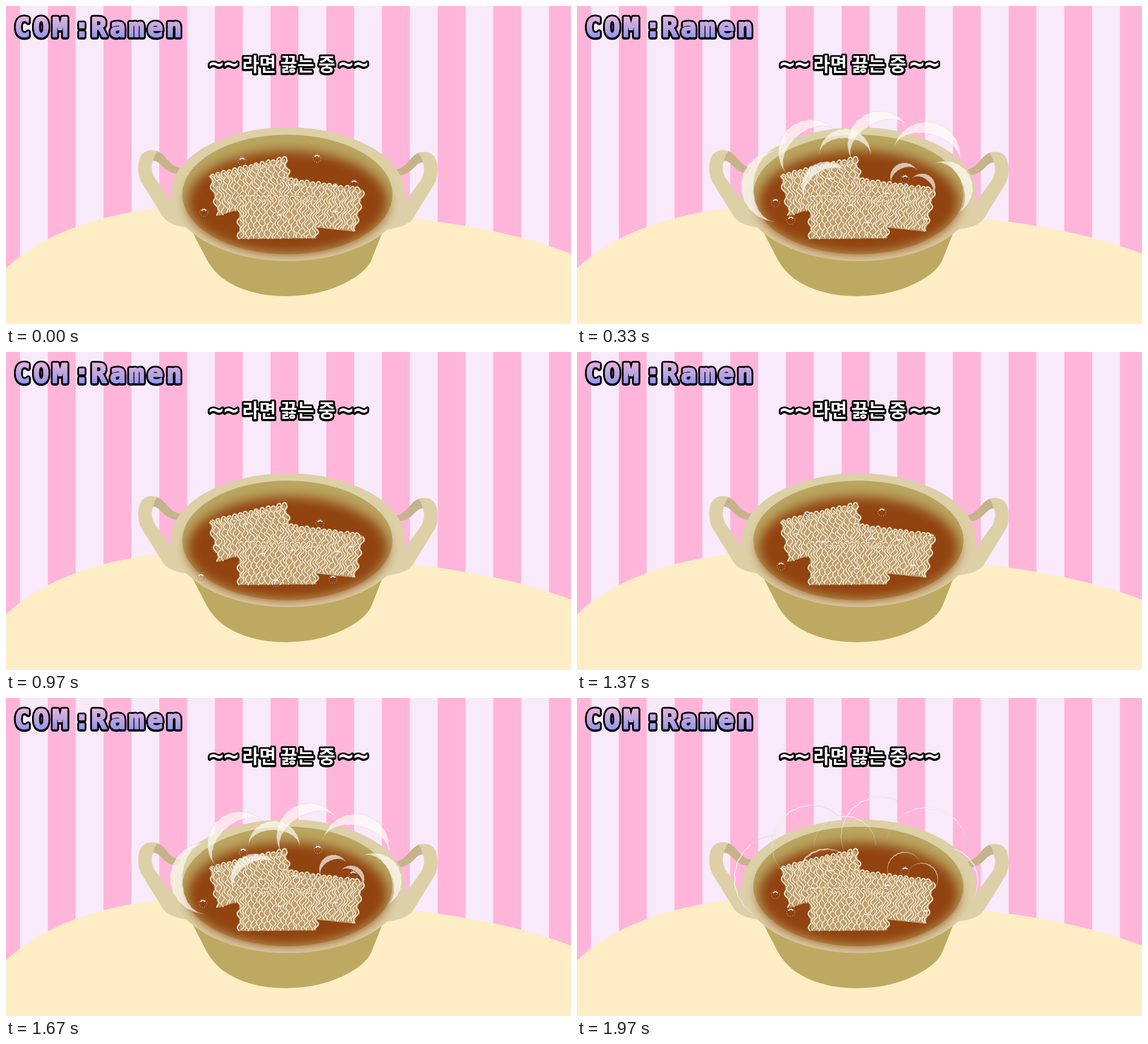
An HTML page with a canvas for the animation above (2.01 s loop, 997 by 561 pixels).

```html
<!DOCTYPE html>
<html lang="ko">
<head>
<meta charset="utf-8">
<title>Ramen</title>
<style>
html, body { margin: 0; width: 100%; height: 100%; overflow: hidden; }
canvas { display: block; }
</style>
</head>
<body>
<canvas id="stage" width="997" height="561"></canvas>
<script>
const W = 997, H = 561, LOOP = 2010, STEP = 33.4, TAU = Math.PI * 2;
const ctx = document.getElementById('stage').getContext('2d');
const scene = document.createElement('canvas');
scene.width = W;
scene.height = H;
const bg = scene.getContext('2d');

let seed = 7;
const rand = () => (seed = seed * 16807 % 2147483647) / 2147483647;

function shape(color, d) {
  bg.fillStyle = color;
  bg.fill(new Path2D(d));
}

function ellipse(color, x, y, rx, ry) {
  bg.beginPath();
  bg.ellipse(x, y, rx, ry, 0, 0, TAU);
  bg.fillStyle = color;
  bg.fill();
}

function gradient(y0, y1, from, to) {
  const g = bg.createLinearGradient(0, y0, 0, y1);
  g.addColorStop(0, from);
  g.addColorStop(1, to);
  return g;
}

function backdrop() {
  bg.fillStyle = '#f8eafa';
  bg.fillRect(0, 0, W, H);
  bg.fillStyle = '#ffb5da';
  for (let x = -24.4; x < W; x += 98.25) bg.fillRect(x, 0, 49.2, H);
  shape('#feedc5', 'M0 463C60 405 160 368 275 356L300 354L700 373C800 383 910 403 997 437V561H0Z');
}

function handle() {
  shape('#c5b38a', 'M256 256Q270 252 282 268Q294 284 309 286L303 296Q286 295 274 281Q264 270 256 274Z');
  shape('#ddd0a7', 'M268 256Q246 250 237 266Q229 288 238 309L277 372Q288 388 328 392L312 350L292 344' +
    'L262 303Q253 286 261 268Q263 260 268 256Z');
}

function pot() {
  shape('#bea963', 'M326 393L354 447Q364 466 383 481Q427 512 495 512Q560 511 607 484Q634 469 644 450L664 400Z');
  handle();
  bg.save();
  bg.translate(995, 3);
  bg.scale(-1, 1);
  handle();
  bg.restore();
  ellipse('#baa660', 496.5, 332.5, 185.5, 105.5);
  ellipse('#ddd0a7', 497.5, 332, 206.5, 118);
  bg.save();
  bg.clip();
  ellipse('#baa660', 496.5, 332.5, 185.5, 105.5);
  bg.filter = 'blur(10px)';
  ellipse('#914310', 497, 346, 177, 91);
  bg.restore();
}

// Curly strands woven between the corners a, b, c, d (clockwise from top left).
function noodles(a, b, c, d) {
  const mix = (p, q, k) => p + (q - p) * k;
  const at = (u, v) => [0, 1].map(i => mix(mix(a[i], b[i], u), mix(d[i], c[i], u), v));
  const width = Math.hypot(b[0] - a[0], b[1] - a[1]);
  const height = Math.hypot(d[0] - a[0], d[1] - a[1]);
  const draw = path => {
    bg.strokeStyle = 'rgba(140,95,50,.6)';
    bg.lineWidth = 4;
    bg.stroke(path);
    bg.strokeStyle = '#f0e1c1';
    bg.lineWidth = 2.6;
    bg.stroke(path);
  };
  bg.lineCap = bg.lineJoin = 'round';
  shape('#c3a475', 'M' + [a, b, c, d].join('L') + 'Z');

  for (let u = .03; u < 1; u += 10 / width) {
    const [x, y] = at(u, .04), loop = new Path2D();
    loop.ellipse(x, y, 4, 4 + rand() * 3, rand() - .5, 0, TAU);
    draw(loop);
  }
  const count = Math.round(width / 4.8);
  for (let j = 0; j <= count; j++) {
    const path = new Path2D(), phase = rand() * TAU, wave = 18 + rand() * 9;
    const start = rand() * .06, end = 1 - rand() * .03;
    for (let v = start; v <= end; v += .02) {
      const [x, y] = at(j / count, v);
      path.lineTo(x + 3.4 * Math.sin(v * height / wave * TAU + phase), y);
    }
    draw(path);
  }
}

function outlined(text, x, y, font, fill, spacing = 0, bold = 0) {
  bg.font = font;
  bg.letterSpacing = spacing + 'px';
  bg.lineJoin = 'round';
  bg.strokeStyle = '#000';
  bg.lineWidth = 6 + bold;
  bg.strokeText(text, x, y);
  bg.strokeText(text, x, y + 1);
  bg.fillStyle = bg.strokeStyle = fill;
  bg.fillText(text, x, y);
  bg.lineWidth = bold;
  if (bold) bg.strokeText(text, x, y);
}

function captions() {
  const mono = '"DejaVu Sans Mono", monospace';
  const purple = gradient(18, 56, '#e6b4da', '#9496e8');
  const word = (text, x) => outlined(text, x, 54, 'bold 46px ' + mono, purple, 5.5, 2.5);
  word('COM', 15);
  word(':', 120);
  word('Ramen', 150);
  bg.textAlign = 'center';
  outlined('라면 끓는 중', 499, 115, '900 32.5px "Noto Sans CJK KR", "Noto Sans CJK", sans-serif', '#fff');
  for (const x of [384, 613]) outlined('~~', x, 117, 'bold 44px ' + mono, '#fff');
}

backdrop();
pot();
noodles([360, 299], [492, 269], [506, 330], [375, 370]);
noodles([488, 305], [630, 324], [615, 398], [480, 384]);
noodles([411, 337], [552, 337], [547, 410], [412, 411]);
captions();

function bubble(x, y) {
  const arc = (color, width, r, from, to, dash = []) => {
    ctx.setLineDash(dash);
    ctx.strokeStyle = color;
    ctx.lineWidth = width;
    ctx.beginPath();
    ctx.arc(x, y, r, from, to);
    ctx.stroke();
  };
  arc('rgba(70,30,8,.3)', 1, 6, 0, TAU);
  arc('rgba(255,250,240,.8)', 1, 7, 0, TAU, [1.5, 2.2]);
  arc('#fff', 1.8, 5, 3.7, 5.7);
  ctx.setLineDash([]);
}

// Two groups of five rise and sway; they share one cycle but start apart.
const CYCLE = 49;
const groups = [
  { start: -30, spots: [[580, 350], [480, 356], [347, 347], [450, 309], [582, 305]] },
  { start: -8, spots: [[509, 386], [612, 380], [374, 378], [551, 335], [419, 340]] }
];

function bubbles(i) {
  const sway = 5 + 8 * Math.cos((i - 17) / CYCLE * 2 * TAU);
  for (const { start, spots } of groups) {
    const age = (i - 10 - start + CYCLE) % CYCLE + start;
    spots.forEach(([x, y], k) => bubble(x + (k < 3 ? sway : -sway), y - 1.7 * age));
  }
}

// Centre, radius and the direction in degrees that each puff opens away from.
const puffs = [
  [352, 318, 62, 183], [413, 258, 57, 229], [473, 262, 45, 272],
  [535, 243, 57, 239], [617, 264, 59, 284], [650, 322, 48, 335],
  [440, 318, 43, 237], [578, 302, 25, 243], [609, 319, 23, 310]
];

// A puff swells from a disc and hollows out to a thin arc.
function steam(i) {
  const age = (i % 40 - 2) / 18;
  if (age <= 0 || age > 1) return;
  const left = (1 - age) ** 3;
  ctx.fillStyle = 'rgba(255,253,248,.68)';
  ctx.strokeStyle = 'rgba(190,185,165,.4)';
  ctx.lineWidth = .7;
  for (const [x, y, size, turn] of puffs) {
    const r = size * 1.213 * (1 - left);
    const hollow = 1 - 1.8 * left - Math.min(.05, 2.5 / r);
    const dir = turn / 360 * TAU, cos = Math.cos(dir), sin = Math.sin(dir);
    const edge = (a, squash) => {
      const rough = 1 + .012 * Math.sin(a * 23 + x) * Math.cos(a);
      const u = Math.cos(a) * r * squash * rough, v = Math.sin(a) * r * rough;
      return [x + u * cos - v * sin, y + u * sin + v * cos];
    };
    const outer = [], inner = [];
    for (let a = -TAU / 4; a <= TAU / 4; a += TAU / 90) {
      outer.push(edge(a, 1));
      inner.unshift(edge(a, hollow));
    }
    const path = new Path2D('M' + [...outer, ...inner].join('L') + 'Z');
    ctx.fill(path);
    ctx.stroke(path);
  }
}

function frame() {
  const i = Math.min(59, Math.floor((performance.now() % LOOP + 5) / STEP));
  ctx.drawImage(scene, 0, 0);
  bubbles(i);
  steam(i);
  requestAnimationFrame(frame);
}
frame();
</script>
</body>
</html>
```
